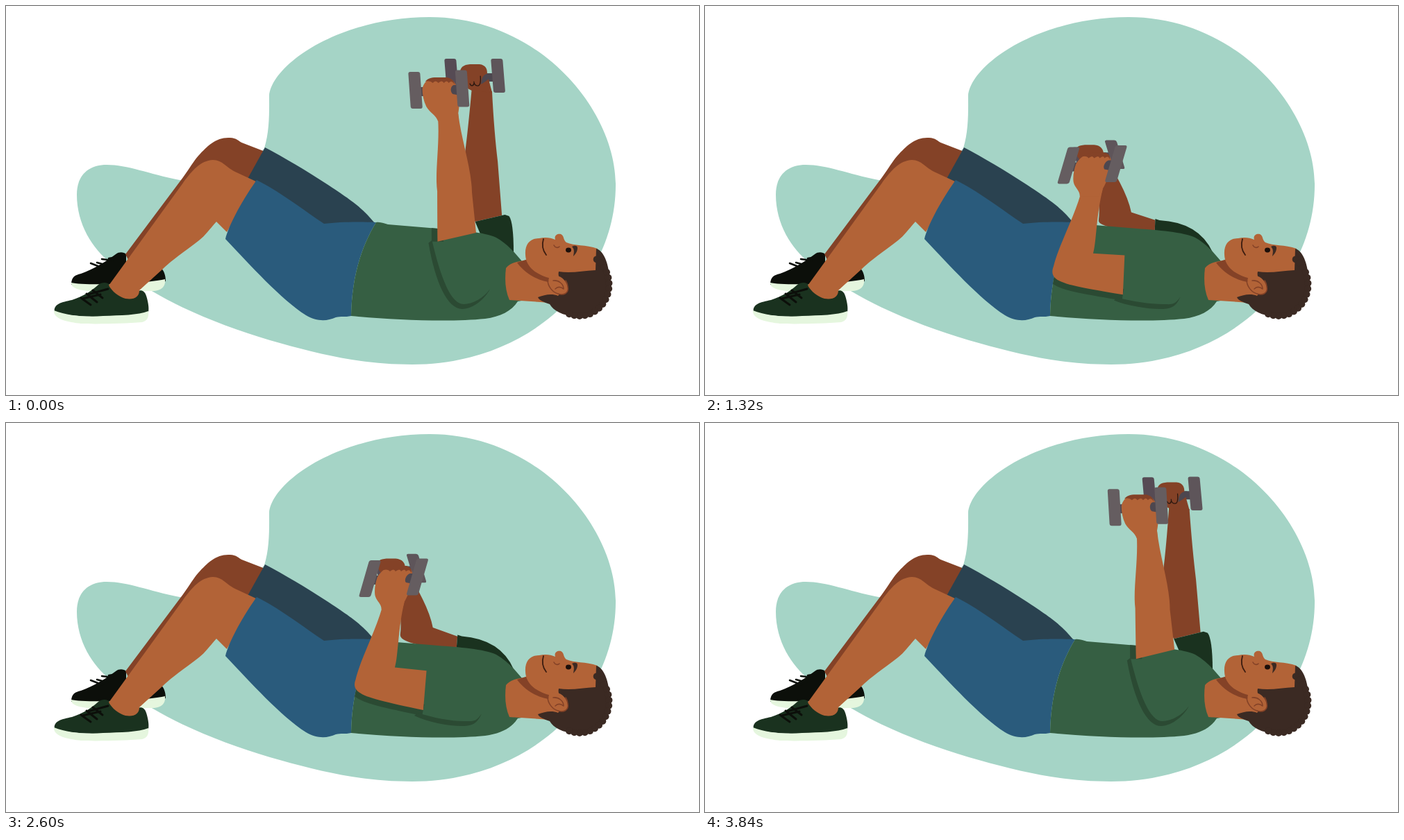
These frames come from a looping animation (998x561 px, 3880 ms). An HTML page:

```html
<!DOCTYPE html>
<html lang="en">
<head>
<meta charset="utf-8">
<title>Dumbbell press</title>
<style>
html, body { margin: 0; width: 100%; height: 100%; overflow: hidden; background: #fff; }
svg { display: block; width: 100%; height: 100%; }
.skin { fill: #b26337; }
.deep { fill: #844227; }
.dark { fill: #1a321f; }
.shade { fill: #2b4a33; }
.sole { fill: #e5f6de; }
.hair { fill: #3b2a23; }
.line { fill: none; stroke-linecap: round; stroke-linejoin: round; }
</style>
</head>
<body>
<svg viewBox="0 0 998 561">
  <defs>
    <path id="torso" d="M533 312C540 311 545 314 550 315L622 321C650 323 690 326 706 334C722 343 733 356 743 368L748 424L737 426C728 440 712 448 690 451C640 456 560 453 497 447C498 400 507 355 533 312Z"/>
    <clipPath id="onTorso"><use href="#torso"/></clipPath>
  </defs>

  <path fill="#a5d4c6" d="M379 130C382 85 480 16 610 16C768 16 878 150 878 258C878 400 750 517 585 517C510 517 450 502 380 482C320 464 258 440 210 411C180 395 165 383 150 370C125 350 102 315 102 272C102 245 118 229 145 229C175 229 205 242 250 251L330 260L372 205C380 180 379 150 379 130Z"/>

  <!-- far leg -->
  <path fill="#0c0f0a" d="M94 402C94 390 100 388 108 386C125 380 145 368 158 358C163 354 170 355 173 358L173 370C180 390 210 382 222 378C228 380 230 390 230 397L200 402Z"/>
  <path class="sole" d="M94 399C110 403 190 402 229 394C230 404 225 411 210 411L130 412C110 411 93 408 94 399Z"/>
  <path class="line" stroke="#0c0f0a" stroke-width="2.5" d="M122 371L140 378M131 370L146 374M138 365L154 367M148 364L160 362"/>
  <path class="deep" d="M172 358L255 247C265 233 270 224 277 216C290 202 302 190 320 190C332 189 334 195 342 198L373 210L350 250L300 300L176 366Z"/>
  <path fill="#2a4250" d="M373 204C415 226 472 262 500 283C512 292 522 302 531 313L458 316L348 249Z"/>

  <!-- near leg -->
  <path class="dark" d="M70 441C68 430 80 427 95 424C112 418 122 412 133 402C138 398 147 398 150 403L154 408C165 420 185 420 190 411C195 409 200 411 202 418C205 428 206 435 205 442C190 447 160 447 140 448C110 449 80 445 70 441Z"/>
  <path class="sole" d="M69 439C90 447 115 449 140 447C165 446 190 446 205 440C206 448 204 454 196 456C170 458 130 459 108 458C90 456 68 452 69 439Z"/>
  <path class="skin" d="M148 403L250 262C265 241 278 223 298 222C312 222 318 234 332 240L360 253L318 326L303 311C293 322 287 331 278 338C262 351 245 361 225 380L192 410C192 420 184 424 172 422C162 419 153 412 148 403Z"/>
  <path class="line" stroke="#0c0f0a" stroke-width="3" d="M108 421L122 431M116 415L131 427M125 410L139 421M110 422L136 416M118 416L147 408"/>
  <path fill="#2a5b7c" d="M361 251C395 268 425 292 458 314C480 311 510 311 533 312C507 355 498 400 497 447C488 449 482 447 475 449C462 455 447 455 432 446C396 423 352 374 316 336C320 318 340 280 361 251Z"/>

  <!-- far arm -->
  <g id="farBell">
    <rect x="-56" y="-28" width="44" height="12" fill="#4d474f"/>
    <rect id="farPlate" x="-85" y="-49" width="17" height="49" rx="3" fill="#564b54"/>
    <rect x="-18" y="-49" width="17" height="49" rx="3" fill="#5e555a"/>
  </g>
  <path id="farArm" class="deep"/>
  <g id="farHand">
    <path class="deep" d="M-49 -3C-60 -8 -66 -18 -64 -30C-62 -39 -55 -41 -45 -41L-35 -41C-26 -40 -24 -34 -25 -27L-20 0Z"/>
    <path fill="#4d474f" d="M-35 -12C-34 -22 -30 -27 -22 -28L-18 -24L-27 -17Z"/>
    <path class="line" stroke="#2a1710" stroke-width="1.3" d="M-35 -24C-35 -15 -37 -10 -40 -10C-44 -10 -45 -13 -45 -16M-45 -14C-46 -9 -50 -9 -51 -13"/>
  </g>
  <path id="farSleeve" class="dark"/>

  <use href="#torso" fill="#365f43"/>
  <g clip-path="url(#onTorso)">
    <path id="armShade" fill="none" stroke="#2b4a33" stroke-width="17"/>
    <path id="sleeveShade" class="shade"/>
  </g>

  <!-- head -->
  <path class="skin" d="M720 378C727 369 738 369 749 366C745 347 752 335 768 335C777 333 784 334 791 337C789 331 794 328 799 329C804 331 802 337 807 341C818 346 835 344 852 350L852 400L800 430L770 427L725 424C719 410 718 395 720 378Z"/>
  <path class="deep" d="M736 370L749 366C754 382 772 391 790 394L787 399C768 397 748 387 736 370Z"/>
  <g id="curls" class="hair">
    <path d="M850 350C862 353 870 376 869 402C867 428 848 447 825 447C803 448 789 440 783 430C775 427 768 425 766 420C775 417 785 414 795 418L806 404C799 397 794 390 796 383C813 386 830 382 849 381Z"/>
  </g>
  <path class="skin" d="M783 389C795 386 806 393 809 405C811 414 803 418 795 415C785 412 778 401 783 389Z"/>
  <path class="line" stroke="#844227" stroke-width="1.6" d="M806 396C808 399 809 402 809 405C811 414 803 418 795 415C787 413 780 404 780 395M788 396C796 395 803 401 803 408M803 408C799 405 795 404 791 408"/>
  <path class="line" stroke="#3b1c10" stroke-width="1.8" d="M774 336C771 346 774 354 778 359"/>
  <path class="line" stroke="#844227" stroke-width="1.6" d="M789 345C791 349 795 349 797 347"/>
  <ellipse cx="810" cy="352" rx="4" ry="3.4" fill="#1c0f0a"/>
  <path class="hair" d="M815 347C819 345 823 345 823 349C823 354 820 358 817 361C818 355 819 351 815 347Z"/>

  <!-- near arm -->
  <rect id="barLeft" x="-8" y="-6" width="20" height="13" fill="#4d474f"/>
  <rect id="plateLeft" x="-8.5" y="-26" width="17" height="53" rx="3" fill="#655d60"/>
  <path id="arm" class="skin"/>
  <g id="hand">
    <path class="skin" d="M0 3C-3 -6 -12 -9 -17 -18C-21 -26 -23 -36 -23 -44C-21 -52 -16 -58 -8 -58L12 -58C22 -58 26 -50 28 -42C31 -32 31 -18 29 -8L30 3Z"/>
    <path class="deep" d="M-19 -54C-14 -60 -8 -60 0 -60L13 -60Q22 -58 24 -49Q19 -57 15 -52Q12 -57 8 -52Q5 -57 0 -52Q-4 -57 -8 -52Q-12 -56 -19 -54Z"/>
    <path fill="#4d474f" d="M32 -49L22 -49C17 -47 17 -39 21 -36L32 -34Z"/>
  </g>
  <rect id="plateRight" x="-8.5" y="-26" width="17" height="53" rx="3" fill="#655d60"/>
</svg>
<script>
const LOOP = 3880, STEP = 40;
const SHOULDER = [662, 391], FOREARM = 104;
const UP = .03, DOWN = 1.02;

// Each move eases the arm bend: 0 is raised, 1 is lowered.
const moves = [
  { start: 0, time: 560, to: UP },
  { start: 560, time: 560, to: DOWN },
  { start: 1480, time: 640, to: UP },
  { start: 2150, time: 560, to: DOWN },
  { start: 2906, time: 640, to: .01 }
];

const el = id => document.getElementById(id);
const set = (id, name, value) => el(id).setAttribute(name, value);
const add = (p, x, y) => [p[0] + x, p[1] + y];
const mix = (a, b, f) => a.map((v, i) => v + (b[i] - v) * f);
const clamp = v => Math.max(0, Math.min(1, v));
const ease = p => p < .5 ? 4 * p ** 3 : 1 - 4 * (1 - p) ** 3;
const path = (...parts) => parts.map(p => Array.isArray(p) ? p.map(v => v.toFixed(2)).join(" ") : p).join(" ");
const skewed = (p, k, sy = 1) => `matrix(1 0 ${k * sy} ${sy} ${p[0]} ${p[1]})`;

const bendAt = t => moves.reduce((a, m) => a + (m.to - a) * ease(clamp((t - m.start) / m.time)), 0);

// All joints follow from the bend; lock straightens the arms at the very top.
function solve(a) {
  const lock = clamp(1 - a / .16), a2 = a * a;
  const turn = (13 + 73 * a) * Math.PI / 180;
  const sin = Math.sin(turn), cos = Math.cos(turn);
  // Steps along and across the upper arm.
  const go = (p, along, across) => add(p, -sin * along + cos * across, -cos * along - sin * across);

  const k = -.15 - .22 * a + .14 * lock;
  const elbow = go(SHOULDER, 130 + 30 * a, -12 + 20 * a);
  const wrist = add(elbow, -k * FOREARM, -FOREARM);
  const bell = add(wrist, 65 + 33 * lock, -24 - 12 * a2 - 14 * lock);
  const farOuter = add(bell, 8 - 20 * lock, 99 - 35 * a2);
  const farHem = [697 - 48 * a, 306 + 10 * a2];
  const farHalf = 22 - 12 * a2;
  return {
    a, lock, k, elbow, wrist, bell, farOuter,
    hemLow: go(SHOULDER, 59, -28),
    hemTop: go(SHOULDER, 59, 29),
    farInner: add(farOuter, -47, -13 + 24 * a2),
    farHemTop: go(farHem, 0, farHalf),
    farHemLow: go(farHem, 0, -farHalf)
  };
}

function drawNear({ a, k, elbow, wrist, hemLow, hemTop }) {
  const loc = (x, y) => add(wrist, x + k * y, y);
  const grip = (x, y) => skewed(loc(x, y), k + .08);
  const c1 = loc(0, FOREARM + 22 * a * a);
  const c2 = mix(c1, hemLow, .22);

  set("arm", "d", path("M", wrist, "C", loc(3, 36), loc(-4, 78), elbow,
    "C", c1, c2, hemLow, "L", hemTop, loc(50, 106 - 20 * a * a),
    "C", loc(49, 70), loc(34, 31), loc(29, -8), "Z"));
  set("armShade", "d", path("M", elbow, "C", c1, c2, hemLow));
  set("hand", "transform", skewed(wrist, k));
  set("plateLeft", "transform", grip(-33, -42));
  set("barLeft", "transform", grip(-27, -40));
  set("plateRight", "transform", grip(34.5, -44.5));

  const fold = add(hemLow, -13, 2 + 6 * a);
  const end = [697 - 12 * a, 408 + 11 * a];
  const low = [657, 437];
  const out = add(mix(fold, low, .45), -12, 14 * (437 - fold[1]) / 90);
  set("sleeveShade", "d", path("M", fold, "C", out, [636, 437], low,
    "C", [673, 437], add(end, -6, 13), end,
    "C", add(end, -9, 13), [672, 430], [659, 430],
    "C", [641, 430], add(out, 8, -6), add(fold, 5, -4), "Z"));
}

function drawFar({ a, lock, bell, farOuter: outer, farInner: inner, farHemTop: top, farHemLow: low }) {
  const lean = .23 + .07 * a - .15 * lock;
  const sy = 1 - (lean - .08) * .7;
  const loc = (x, y) => add(bell, x + lean * y * sy, y * sy);
  const left = loc(-49, -5), right = loc(-20, -2);
  const pose = skewed(bell, lean, sy);
  set("farBell", "transform", pose);
  set("farHand", "transform", pose);
  set("farPlate", "transform", `translate(${17 * (1 - lock)} ${12 * (1 - lock)})`);
  set("farArm", "d", path("M", left, "L", right,
    "Q", [outer[0] - 5, right[1] + (outer[1] - right[1]) * .6], outer,
    "L", mix(top, low, .1), low,
    "Q", [inner[0], inner[1] + (low[1] - inner[1]) * .75], inner,
    "Q", add(inner, 4, -30), left, "Z"));
  set("farSleeve", "d", path("M", low, "L", top, "L", add(top, 6, 2),
    "Q", [731 - 19 * a, 312], [731, 355], "L", [690, 345], "Z"));
}

function draw(t) {
  const pose = solve(bendAt(t));
  drawFar(pose);
  drawNear(pose);
}

// Small curls around the back of the head.
for (let i = 0; i < 17; i++) {
  const angle = -.95 + i * .18;
  const c = document.createElementNS("http://www.w3.org/2000/svg", "circle");
  c.setAttribute("cx", 826 + 42.5 * Math.cos(angle));
  c.setAttribute("cy", 402 + 45 * Math.sin(angle));
  c.setAttribute("r", 5);
  el("curls").append(c);
}

function tick() {
  const t = performance.now() % LOOP;
  draw(Math.floor(t / STEP) * STEP);
  requestAnimationFrame(tick);
}
tick();
</script>
</body>
</html>
```
